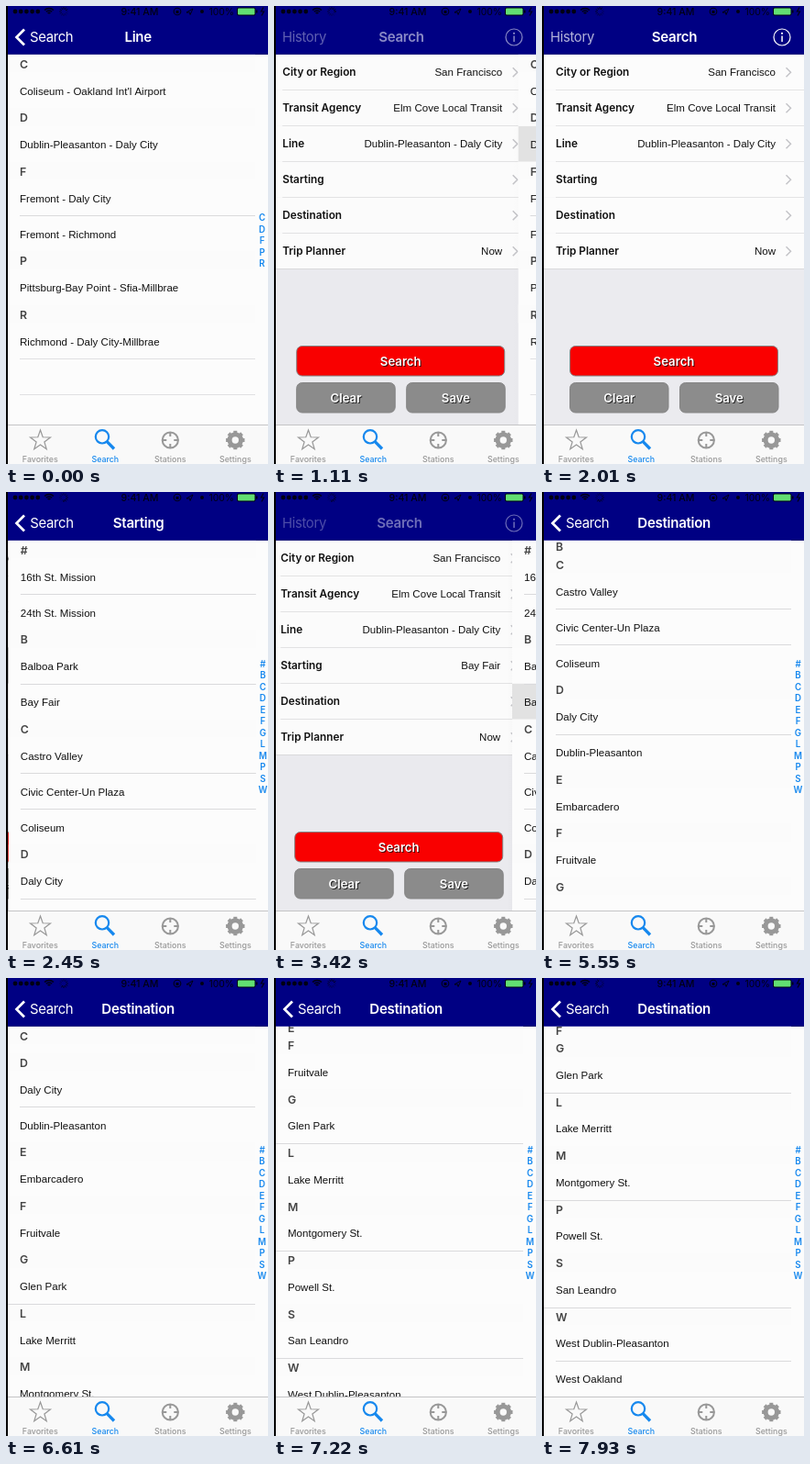
Write an HTML page with a canvas that moves like this. It is 286 by 499 pixels and loops after 8 s.

```html
<!DOCTYPE html>
<html lang="en">
<head>
<meta charset="utf-8">
<title>Trip search</title>
<style>
  html, body { margin: 0; width: 100%; height: 100%; overflow: hidden; background: #000; }
  canvas { display: block; width: 286px; height: 499px; }
</style>
</head>
<body>
<canvas id="stage"></canvas>
<script>
const W = 286, H = 499, LOOP = 8000;
const LEFT = 2, TOP = 52.75, BOTTOM = 456.5, ROW = 39, HEAD = 19.5;
const VIEW = W - LEFT, SLIDE = 380;
const NAVY = '#000083', BLUE = '#1688ee', GRAY = '#989898', PAPER = '#fcfcfc';
const INTER = 'Inter, sans-serif', ARIAL = '"Liberation Sans", Arial, sans-serif';

const canvas = document.getElementById('stage');
const ctx = canvas.getContext('2d');
const ratio = window.devicePixelRatio || 1;
canvas.width = W * ratio;
canvas.height = H * ratio;

const clamp = v => Math.max(0, Math.min(1, v));
const lerp = (a, b, k) => a + (b - a) * k;
const easeOut = (u, power) => 1 - Math.pow(1 - clamp(u), power);
const smooth = (a, b, v) => { const k = clamp((v - a) / (b - a)); return k * k * (3 - 2 * k); };

const stations = [
  ['#', '16th St. Mission', '24th St. Mission'],
  ['B', 'Balboa Park', 'Bay Fair'],
  ['C', 'Castro Valley', 'Civic Center-Un Plaza', 'Coliseum'],
  ['D', 'Daly City', 'Dublin-Pleasanton'],
  ['E', 'Embarcadero'], ['F', 'Fruitvale'], ['G', 'Glen Park'],
  ['L', 'Lake Merritt'], ['M', 'Montgomery St.'], ['P', 'Powell St.'],
  ['S', 'San Leandro'], ['W', 'West Dublin-Pleasanton', 'West Oakland']
];
const lines = [
  ['C', "Coliseum - Oakland Int'l Airport"],
  ['D', 'Dublin-Pleasanton - Daly City'],
  ['F', 'Fremont - Daly City', 'Fremont - Richmond'],
  ['P', 'Pittsburg-Bay Point - Sfia-Millbrae'],
  ['R', 'Richmond - Daly City-Millbrae']
];

// "ruled" names the sections with a line above their heading
const lineScreen = { title: 'Line', sections: lines, ruled: '', loadedAt: -1, pick: lines[1][1], pickAt: 925 };
const startScreen = { title: 'Starting', sections: stations, ruled: 'LPW', loadedAt: 2430, pick: 'Bay Fair', pickAt: 3150 };
const endScreen = { title: 'Destination', sections: stations, ruled: 'LPW', loadedAt: 4750 };

const slides = [
  { at: -SLIDE, screen: lineScreen, push: true },
  { at: 925, screen: lineScreen, push: false },
  { at: 2160, screen: startScreen, push: true },
  { at: 3250, screen: startScreen, push: false },
  { at: 4253, screen: endScreen, push: true }
];

// y is the middle of the capital letters
function text(str, x, y, size, color, { weight = 400, family = INTER, align = 'left', track = 0 } = {}) {
  ctx.font = `${weight} ${size}px ${family}`;
  ctx.letterSpacing = `${track}px`;
  ctx.textAlign = align;
  ctx.fillStyle = color;
  ctx.fillText(str, x, y + size * 0.36);
}

function rect(x, y, w, h, color, radius = 0) {
  ctx.fillStyle = color;
  ctx.beginPath();
  ctx.roundRect(x, y, w, h, radius);
  ctx.fill();
}

function path(points, color, width, closed) {
  ctx.beginPath();
  points.forEach(([x, y]) => ctx.lineTo(x, y));
  if (closed) ctx.closePath();
  ctx.strokeStyle = color;
  ctx.lineWidth = width;
  ctx.stroke();
}

function circle(x, y, r, color, width) {
  ctx.beginPath();
  ctx.arc(x, y, r, 0, Math.PI * 2);
  if (width) {
    ctx.strokeStyle = color;
    ctx.lineWidth = width;
    ctx.stroke();
  } else {
    ctx.fillStyle = color;
    ctx.fill();
  }
}

const rule = (x1, x2, y, color = '#dadadc') => rect(x1, Math.floor(y), x2 - x1, 1, color);

function spinner(x, y, r, rgb, t, width) {
  const step = Math.floor(t / 85);
  for (let i = 0; i < 12; i++) {
    const a = i * Math.PI / 6;
    const fade = ((i - step) % 12 + 12) % 12 / 12;
    path([0.5, 1].map(k => [x + Math.cos(a) * r * k, y + Math.sin(a) * r * k]),
      `rgba(${rgb},${0.2 + 0.7 * fade})`, width);
  }
}

function button(label, x, y, w, h, color) {
  rect(x, y, w, h, color, 6);
  ctx.strokeStyle = '#858585';
  ctx.lineWidth = 1;
  ctx.stroke();
  const style = { weight: 600, align: 'center' };
  text(label, x + w / 2 + 1, y + h / 2 + 1, 13.2, 'rgba(0,0,0,.75)', style);
  text(label, x + w / 2, y + h / 2, 13.2, '#fff', style);
}

function drawForm(t) {
  rect(-100, TOP, 500, BOTTOM - TOP, '#ebebef');
  const rows = [
    ['City or Region', 'San Francisco'],
    ['Transit Agency', 'Elm Cove Local Transit'],
    ['Line', lineScreen.pick],
    ['Starting', t >= startScreen.pickAt ? startScreen.pick : ''],
    ['Destination', ''],
    ['Trip Planner', 'Now']
  ];
  const pressed = t >= 4130 ? 4 : t >= 2040 && t < 2600 ? 3 : -1;
  rows.forEach(([label, value], i) => {
    const y = TOP + i * ROW, mid = y + ROW / 2, on = i === pressed;
    rect(LEFT, y, VIEW, ROW, on ? '#d2d2d2' : PAPER);
    text(label, 15, mid, 11.8, on ? '#fff' : '#111', { weight: 600 });
    text(value, 255, mid, 11.55, on ? '#fff' : '#111', { family: ARIAL, align: 'right' });
    path([[266.5, mid - 5], [271.5, mid], [266.5, mid + 5]], '#c4c4c8', 1.5);
    rule(i === 5 ? LEFT : 15, W, y + ROW - 0.5);
  });
  button('Search', 30.5, 370.5, 227, 32.5, '#fa0000');
  button('Clear', 30.5, 410.5, 107.5, 32.5, '#8c8c8c');
  button('Save', 150.5, 410.5, 107.5, 32.5, '#8c8c8c');
}

function sectionHead(name, y) {
  rect(LEFT, y, 270, HEAD, '#fbfbfb');
  text(name, 15, y + HEAD / 2 + 1, 12.3, '#444', { weight: 600 });
}

function drawRows(screen, t, scroll) {
  let y = TOP - scroll;
  const heads = [];
  for (const [name, ...rows] of screen.sections) {
    heads.push([name, y]);
    y += HEAD;
    rows.forEach((row, i) => {
      if (row === screen.pick && t >= screen.pickAt) rect(LEFT, y, VIEW, ROW, '#e2e2e2');
      text(row, 15, y + ROW / 2 + 0.7, 11.55, '#111', { family: ARIAL });
      if (i) rule(15, 272, y + 0.7);
      y += ROW;
    });
  }
  for (; y < BOTTOM; y += ROW) rule(15, 272, y + 0.4, '#e0e0e2');
  heads.forEach(([name, top]) => {
    sectionHead(name, top);
    if (screen.ruled.includes(name)) rule(LEFT, 272, top + 0.5);
  });
  const current = heads.filter(h => h[1] <= TOP).length - 1;
  const next = heads[current + 1];
  sectionHead(heads[current][0], next ? Math.min(TOP, next[1] - HEAD) : TOP);

  const count = heads.length;
  heads.forEach(([name], i) =>
    text(name, 279.5, 256 + (i - (count - 1) / 2) * 12.5, 9.7, BLUE, { weight: 600, align: 'center' }));
}

function drawList(screen, t, scroll) {
  rect(LEFT, TOP, VIEW, BOTTOM - TOP, PAPER);
  if (t >= screen.loadedAt) return drawRows(screen, t, scroll);
  for (let y = TOP + ROW; y < BOTTOM; y += ROW) rule(15, W, y - 0.5);
  rect(73, 188, 142, 119, '#858585', 8);
  spinner(144, 235, 15, '255,255,255', t, 2.6);
  text('loading...', 143, 278, 15, '#fff', { align: 'center' });
}

function drawNav(screen, p, u, push) {
  rect(LEFT, 0, VIEW, TOP, NAVY);
  const arriving = smooth(0.2, 0.75, u), leaving = clamp(1 - 3.5 * u);
  const formAlpha = push ? leaving : arriving;
  const listAlpha = push ? arriving : leaving;
  const bold = { weight: 600, align: 'center', track: -0.3 };
  const plain = { track: -0.35 };

  ctx.save();
  ctx.globalAlpha = formAlpha;
  text('Search', lerp(144.5, 62, p), 34, 15.1, '#fff', bold);
  circle(262, 34, 9, '#fff', 1.2);
  rect(261.3, 32.5, 1.5, 6.5, '#fff');
  circle(262, 29.8, 1.1, '#fff');
  ctx.globalAlpha = formAlpha * 0.7;
  text('History', 9, 34, 14.9, '#fff', plain);

  ctx.globalAlpha = listAlpha;
  text(screen.title, lerp(W, 144.2, p), 34, 15.1, '#fff', bold);
  text('Search', lerp(120, 26, p), 34, 14.9, '#fff', plain);
  path([[20, 25.5], [11.5, 34], [20, 42.5]], '#fff', 2.7);
  ctx.restore();
}

function drawStatus(t) {
  const ink = 'rgba(0,0,0,.85)';
  for (let i = 0; i < 5; i++) circle(10 + i * 6.2, 6, 2.4, ink);
  for (const r of [2, 4.5, 7]) {
    ctx.beginPath();
    ctx.arc(47, 9.5, r, -Math.PI * 0.75, -Math.PI * 0.25);
    ctx.strokeStyle = ink;
    ctx.lineWidth = 1.5;
    ctx.stroke();
  }
  spinner(63, 6, 5, '0,0,0', t, 1);
  text('9:41 AM', 146, 6, 10.6, ink, { weight: 500, align: 'center' });
  circle(187, 6, 3.8, ink, 1.1);
  rect(185.5, 5, 3, 3, ink);
  path([[197, 7], [204, 3], [201, 9.5], [200.5, 7]], ink, 1, true);
  circle(214, 6, 2, ink);
  text('100%', 249, 6, 10.4, ink, { align: 'right' });
  rect(252, 1.5, 20.5, 9, ink, 2);
  rect(253, 2.5, 18.5, 7, '#62df72', 1);
  rect(273, 4.5, 1.5, 3, ink);
  path([[281, 1.5], [278.5, 6], [281.5, 6], [279, 10.5]], ink, 1.2);
}

function radial(cx, cy, count, radius) {
  return Array.from({ length: count }, (_, i) => {
    const a = i * 2 * Math.PI / count - Math.PI / 2;
    return [cx + Math.cos(a) * radius(i), cy + Math.sin(a) * radius(i)];
  });
}

function drawTabs() {
  rect(LEFT, BOTTOM, VIEW, H - BOTTOM, '#f9f9f9');
  rule(LEFT, W, BOTTOM, '#c4c4c6');
  ['Favorites', 'Search', 'Stations', 'Settings'].forEach((name, i) =>
    text(name, 37.3 + i * 71, 493.3, 8.9, i === 1 ? BLUE : GRAY, { weight: 500, align: 'center' }));

  path(radial(37.5, 473.5, 10, i => i % 2 ? 4.6 : 11.5), GRAY, 1.2, true);

  circle(105, 469.3, 7.2, BLUE, 2.2);
  path([[110.3, 474.7], [118, 482.5]], BLUE, 3.3);

  circle(179.3, 473, 8.6, GRAY, 2);
  for (const [dx, dy] of [[0, 1], [0, -1], [1, 0], [-1, 0]])
    path([[179.3 + dx * 4, 473 + dy * 4], [179.3 + dx * 9, 473 + dy * 9]], GRAY, 2);

  circle(250.3, 473, 6.2, GRAY, 5);
  radial(250.3, 473, 8, () => 10.2).forEach(([x, y]) =>
    path([[lerp(250.3, x, 0.75), lerp(473, y, 0.75)], [x, y]], GRAY, 4));
}

function draw(t) {
  const slide = slides.filter(s => s.at <= t).pop();
  const { screen, push } = slide;
  const u = clamp((t - slide.at) / SLIDE);
  const p = push ? easeOut(u, 4) : 1 - easeOut(u, 4);
  const scroll = screen === endScreen
    ? 302.5 * easeOut((t - 5200) / 1360, 3) + 230.25 * easeOut((t - 6900) / 850, 3)
    : 0;
  const edge = (1 - p) * VIEW;

  ctx.setTransform(ratio, 0, 0, ratio, 0, 0);
  rect(0, 0, W, H, '#000');
  ctx.save();
  ctx.beginPath();
  ctx.rect(LEFT, 0, VIEW, H);
  ctx.clip();
  if (p < 1) {
    ctx.save();
    ctx.translate(-0.3 * VIEW * p, 0);
    drawForm(t);
    ctx.restore();
    rect(LEFT, TOP, VIEW, BOTTOM - TOP, `rgba(0,0,0,${0.05 * p})`);
    const shade = ctx.createLinearGradient(edge - 4, 0, edge + LEFT, 0);
    shade.addColorStop(0, 'rgba(0,0,0,0)');
    shade.addColorStop(1, `rgba(0,0,0,${0.12 * p})`);
    rect(edge - 4, TOP, 4 + LEFT, BOTTOM - TOP, shade);
  }
  if (p > 0) {
    ctx.save();
    ctx.translate(edge, 0);
    drawList(screen, t, scroll);
    ctx.restore();
  }
  drawNav(screen, p, u, push);
  drawStatus(t);
  drawTabs();
  ctx.restore();
}

function tick() {
  draw(performance.now() % LOOP);
  requestAnimationFrame(tick);
}
tick();
</script>
</body>
</html>
```
